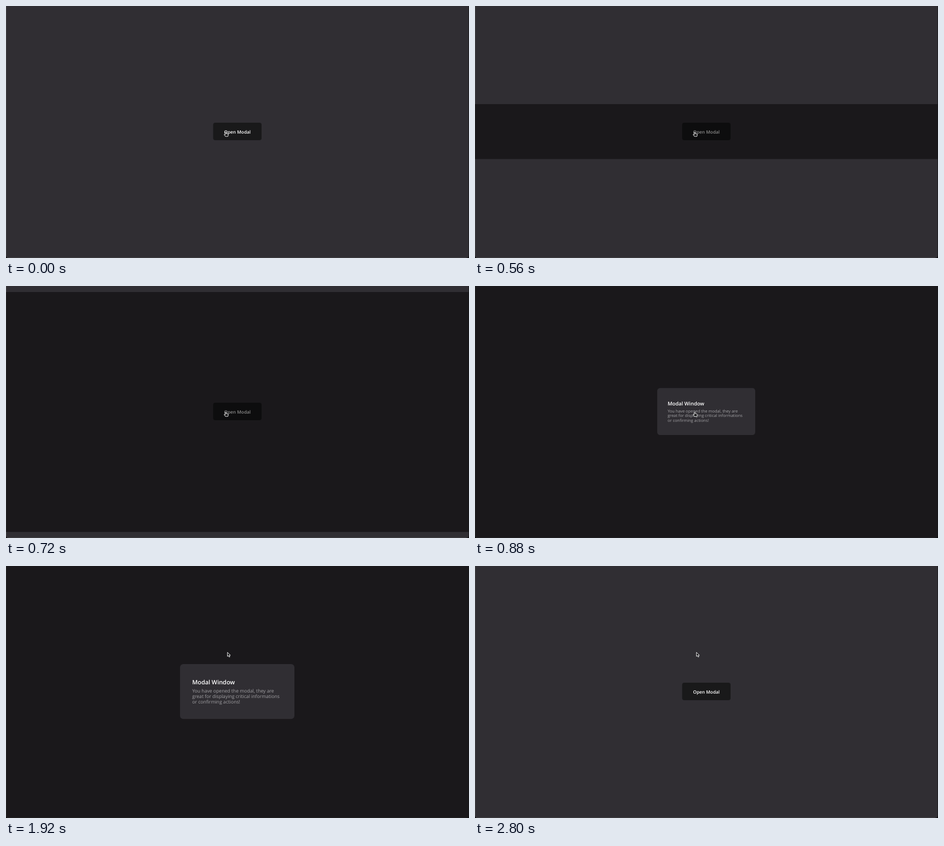
These frames come from a looping animation (846 px wide and 460 px high, 2.96 s). An HTML page:

```html
<!DOCTYPE html>
<html lang="en">
<head>
<meta charset="utf-8">
<title>Modal</title>
<style>
  html, body { margin: 0; width: 100%; height: 100%; overflow: hidden; background: #08080a; }
  svg { display: block; width: 846px; height: 460px; }
  text { font-family: "Open Sans", "Noto Sans", sans-serif; font-weight: 600; fill: #fff; text-rendering: geometricPrecision; }
  .copy text { font-size: 8.63px; font-weight: 400; fill: #a2a1a4; }
  .cursor { fill: #151516; stroke: #fff; stroke-width: .9; stroke-linejoin: round; }
</style>
</head>
<body>
<svg viewBox="0 0 846 460">
  <defs>
    <clipPath id="window"><path d="M0 0H845.5V455Q845.5 460 841 460H5Q0 460 0 455Z"/></clipPath>
  </defs>
  <g clip-path="url(#window)">
    <rect width="846" height="460" fill="#302e33"/>
    <path d="M.5 0V455Q.5 459.5 5 459.5H841" fill="none" stroke="#434246"/>
    <rect x="378.5" y="213" width="88.5" height="32" rx="4" fill="#19191a"/>
    <text x="422.8" y="232.7" font-size="8.25" text-anchor="middle">Open Modal</text>
    <g id="overlay">
      <rect id="shade" x="-423" y="-230" width="846" height="460" opacity=".47"/>
      <g id="modal">
        <rect x="318" y="179" width="209" height="100.3" rx="6" fill="#302e33"/>
        <text x="340.2" y="216" font-size="10.9">Modal Window</text>
        <g class="copy">
          <text x="340.2" y="231">You have opened the modal, they are</text>
          <text x="340.2" y="241.2">great for displaying critical informations</text>
          <text x="340.2" y="251.3">or confirming actions!</text>
        </g>
      </g>
    </g>
  </g>
  <path id="hand" class="cursor" transform="translate(401.5 229.8)"
    d="M-.8 .6Q0-.5 .8 .6V3.2L3.8 3.8Q4.8 4 4.7 5.2L4 8.2H-.6L-2.9 5.2Q-2.8 4.2-1.9 4.4L-.8 5.2Z"/>
  <path id="arrow" class="cursor" d="M.4 .6V8L2.1 6.5L3.4 9.2L4.8 8.6L3.6 6H5.8Z"/>
</svg>
<script>
  const LOOP = 2960, STEP = 80;
  const el = id => document.getElementById(id);
  const [overlay, shade, modal, hand, arrow] = ["overlay", "shade", "modal", "hand", "arrow"].map(el);

  const span = (t, from, length) => Math.min(1, Math.max(0, (t - from) / length));
  const easeOut = x => 1 - (1 - x) ** 5.5;
  const bezier = (s, a, b, c, d) =>
    a * (1 - s) ** 3 + 3 * b * s * (1 - s) ** 2 + 3 * c * s * s * (1 - s) + d * s ** 3;

  const show = (node, on) => node.setAttribute("visibility", on ? "visible" : "hidden");
  const move = (node, value) => node.setAttribute("transform", value);

  function draw(t) {
    // A thin line spreads sideways, then unfolds vertically.
    const wide = easeOut(span(t, 225, 317));
    const tall = .005 + .995 * easeOut(span(t, 542, 420));
    show(shade, wide > 0);
    move(shade, `translate(423 ${229 + tall}) scale(${wide} ${tall})`);

    const zoom = easeOut(span(t, 755, 420));
    show(modal, zoom > 0);
    move(modal, `translate(422.5 229.2) scale(${zoom}) translate(-422.5 -229.2)`);

    overlay.setAttribute("opacity", 1 - span(t, 2320, 480));

    const moving = t >= 1440;
    const path = (1 - Math.cos(Math.PI * span(t, 1380, 540))) / 2;
    show(hand, !moving);
    show(arrow, moving);
    move(arrow, `translate(${bezier(path, 401, 438, 448, 404.3)} ${bezier(path, 230, 224, 180, 157)})`);
  }

  const start = performance.now();
  function tick() {
    const t = (performance.now() - start) % LOOP;
    draw(Math.floor(t / STEP) * STEP);
    requestAnimationFrame(tick);
  }
  tick();
</script>
</body>
</html>
```
